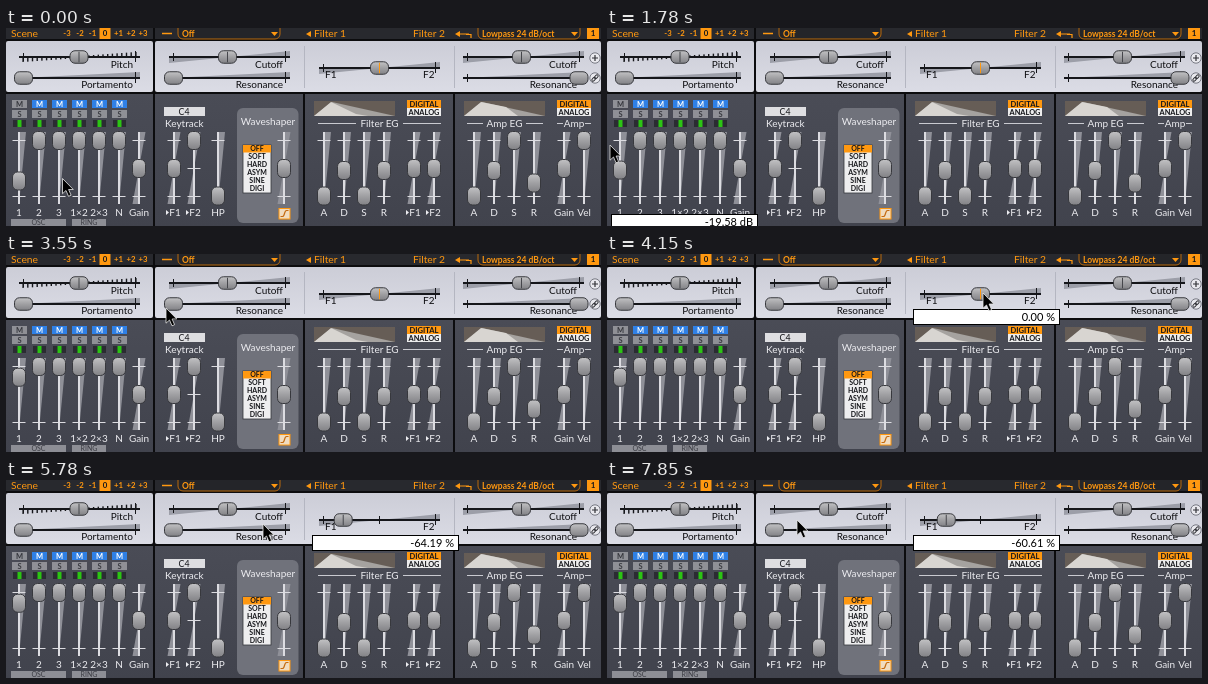
Write an HTML page that moves like this. It is 595x198 px and loops after 8000 ms.

```html
<!DOCTYPE html>
<html lang="en">
<head>
<meta charset="utf-8">
<title>Synth panel</title>
<style>
html, body { margin: 0; width: 100%; height: 100%; overflow: hidden; background: #0c0c0e; }
svg { display: block; width: 595px; height: 198px; font-family: Lato, "Open Sans", sans-serif; }
</style>
</head>
<body>
<svg id="stage" viewBox="0 0 595 198">
  <defs>
    <linearGradient id="light" x2="0" y2="1"><stop stop-color="#cccdd7"/><stop offset="1" stop-color="#dbdce5"/></linearGradient>
    <linearGradient id="dark" x2="0" y2="1"><stop stop-color="#4a4c56"/><stop offset="1" stop-color="#41434d"/></linearGradient>
    <linearGradient id="knob" x2="0" y2="1"><stop stop-color="#c2c2c4"/><stop offset=".5" stop-color="#a0a0a3"/><stop offset="1" stop-color="#828286"/></linearGradient>
  </defs>
</svg>
<script>
const NS = 'http://www.w3.org/2000/svg';
const stage = document.getElementById('stage');
const ORANGE = '#ff9810', INK = '#15161a', PALE = '#ececf0', BAR = '#28292e';

function add(tag, attrs, parent = stage) {
  const el = document.createElementNS(NS, tag);
  for (const k in attrs) el.setAttribute(k, attrs[k]);
  return parent.appendChild(el);
}
const box = (x, y, width, height, fill, more) => add('rect', { x, y, width, height, fill, ...more });
const path = (d, fill, more) => add('path', { d, fill, ...more });
const stroke = (d, color, w = 1) => path(d, 'none', { stroke: color, 'stroke-width': w });
function text(str, x, y, fill, size = 10, anchor = 'start', weight = 400, parent = stage) {
  const el = add('text', { x, y, fill, 'font-size': size, 'text-anchor': anchor, 'font-weight': weight }, parent);
  el.textContent = str;
  return el;
}
function knob(w, h, notch) {
  const g = add('g', {});
  add('rect', { x: -w / 2, y: -h / 2, width: w, height: h, rx: 5, fill: 'url(#knob)', stroke: '#37383d' }, g);
  if (notch) add('path', { d: `M0 ${1 - h / 2}V${h / 2 - 1}`, stroke: '#45464b' }, g);
  return g;
}
const place = (el, x, y) => el.setAttribute('transform', `translate(${x.toFixed(2)} ${y.toFixed(2)})`);

// Horizontal slider: 121 px groove, end marks where the knob stops
function hSlider(x, y, at, kind, labels) {
  const r = x + 121, c = x + 60.5, bipolar = kind !== 'single';
  if (kind === 'single') path(`M${x} ${y}L${r} ${y - 6}V${y}Z`, '#9c9ea8');
  if (kind === 'split') path(`M${x} ${y}V${y + 6}L${r} ${y - 6}V${y}Z`, '#9c9ea8');
  if (kind === 'ticks') {
    for (let i = -12; i <= 12; i++) {
      const h = 1 + Math.abs(i) / 3;
      box(c + i * 4.7 - .7, i < 0 ? y : y - h, 1.4, h, INK);
    }
  }
  box(x, y - 1, 121, 2, INK);
  stroke(`M${x + 4.5} ${y - 4}v8M${r - 4.5} ${y - 6}v11`, INK);
  if (bipolar) stroke(`M${c} ${y - 4}v8`, INK);
  for (const [s, lx, ly, a] of labels) text(s, lx, ly, '#0d0d10', 10, a);
  const k = knob(18, 12.5, bipolar);
  place(k, at, y);
  return k;
}

// Vertical slider: groove from 104 to 176, marks where the knob stops
function vSlider(x, y, split, label) {
  if (split) path(`M${x} 176H${x - 6.5}L${x + 6.5} 104H${x}Z`, '#8f9098');
  else path(`M${x} 176V104H${x + 7}Z`, '#8f9098');
  box(x - 1, 104, 2, 72, '#dcdce1');
  for (const m of split ? [112, 140, 168] : [112, 168]) box(x - 6.5, m, 13, 1, '#dcdce1');
  const arrow = label[0] === '▸';
  text(arrow ? label.slice(1) : label, arrow ? x + 1 : x, 188, PALE, 10, 'middle');
  if (arrow) path(`M${x - 8} 182l3 2.5l-3 2.5z`, PALE);
  const k = knob(13, 18);
  place(k, x, y);
  return k;
}

function modeSwitch(x) {
  box(x, 72, 34, 8, ORANGE);
  box(x, 80, 34, 8, '#ececec');
  text('DIGITAL', x + 17, 78.8, INK, 7.6, 'middle', 700);
  text('ANALOG', x + 17, 86.8, INK, 7.4, 'middle', 700);
}
function combo(x, label) {
  box(x, -6, 102, 17, '#242529', { rx: 5, stroke: '#b96a0c' });
  text(label, x + 4, 8.6, ORANGE, 8.5, 'start', 700);
  path(`M${x + 93} 4h7l-3.5 4z`, ORANGE);
}
function envelope(x, hold) {
  box(x, 73, 81, 15, '#665d56');
  path(`M${x} 88L${x + 18} 74L${x + 81} 88Z`, '#a5a29f');
  path(`M${x} 88L${x + 17} 74L${x + 42} ${hold}L${x + 54} 88Z`, '#d8d5d1');
}

// Top bar
box(0, 0, 147, 11, BAR);
box(149, 0, 446, 11, BAR);
text('Scene', 5, 8.8, ORANGE, 10.3);
box(93.5, 0, 11, 11, ORANGE);
['-3', '-2', '-1', '0', '+1', '+2', '+3'].forEach((s, i) =>
  text(s, [61, 74, 86.5, 99, 112.5, 125, 137][i], 8.3, s === '0' ? INK : ORANGE, 7.8, 'middle', 700));
stroke('M156 5.5h10', ORANGE, 1.5);
combo(172, 'Off');
path('M305 3v6l-5-3z', ORANGE);
text('Filter 1', 308, 8.8, ORANGE, 10.3);
text('Filter 2', 407, 8.8, ORANGE, 10.3);
path('M454 3v6l-5-3z', ORANGE);
stroke('M454 6h9M465 10V6.5H460', ORANGE, 1.2);
combo(472, 'Lowpass 24 dB/oct');
box(581, 0, 12, 11, ORANGE);
text('1', 587, 8.4, INK, 8, 'middle', 700);

// Light panels
box(0, 13, 147, 51, 'url(#light)', { rx: 2 });
box(149, 13, 446, 51, 'url(#light)', { rx: 2 });
stroke('M298.5 18v42M448.5 18v42', '#b4b6c1');
hSlider(13, 29, 73, 'ticks', [['Pitch', 127, 40, 'end']]);
hSlider(13, 50, 17.5, 'single', [['Portamento', 127, 60, 'end']]);
hSlider(163, 29, 221.5, 'split', [['Cutoff', 277, 39.5, 'end']]);
hSlider(163, 50, 167.5, 'single', [['Resonance', 277, 60, 'end']]);
const balance = hSlider(313, 40, 373, 'split', [['F1', 319, 50], ['F2', 417, 50]]);
hSlider(457, 29, 515.5, 'split', [['Cutoff', 571, 39.5, 'end']]);
hSlider(457, 50, 573, 'single', [['Resonance', 571, 60, 'end']]);
for (const y of [30, 50]) add('circle', { cx: 589, cy: y, r: 5.2, fill: '#e9e9ee', stroke: '#777983' });
stroke('M586 30h6M589 27v6', '#303136', 1.2);
for (const [x, y] of [[587.7, 51.3], [590.3, 48.7]])
  add('ellipse', { cx: x, cy: y, rx: 2.3, ry: 1.3, fill: 'none', stroke: '#303136', transform: `rotate(-45 ${x} ${y})` });

// Dark panels
for (const [x, w] of [[0, 147], [149, 148], [299, 148], [449, 146]]) box(x, 66, w, 132, 'url(#dark)');

// Mixer
let level;
['1', '2', '3', '1×2', '2×3', 'N'].forEach((s, i) => {
  const x = 13 + i * 20;
  box(x - 7, 72, 15, 8, i ? '#2f80e6' : '#8f9096');
  text('M', x + .5, 79, i ? '#fff' : '#35363c', 7.5, 'middle', 700);
  box(x - 7, 82, 15, 8, '#8f9096');
  text('S', x + .5, 89, '#3a3b41', 7.5, 'middle', 700);
  box(x - 6, 92, 13, 7, '#2b2c32');
  box(x - 1.5, 92, 4, 7, '#2cc414');
  const k = vSlider(x, 112.5, false, s);
  if (!i) level = k;
});
vSlider(133, 140.5, true, 'Gain');
for (const [x, w, s] of [[5, 55, 'OSC'], [66, 34, 'RING']]) {
  box(x, 191, w, 7, '#8d8e95');
  text(s, x + w / 2, 197, '#3b3c43', 7, 'middle');
}

// Keytrack
box(158, 79, 41, 9, '#dedee1');
text('C4', 178, 86.7, INK, 8.8, 'middle');
text('Keytrack', 159, 99, PALE);
vSlider(168, 140.5, true, '▸F1');
vSlider(188, 112.5, true, '▸F2');
vSlider(212, 168, false, 'HP');

// Waveshaper
box(231, 80, 61.5, 115, '#70727b', { rx: 6 });
text('Waveshaper', 262, 97, PALE, 10, 'middle');
box(237, 117, 28, 48, '#eeeeef', { stroke: '#34353b', 'stroke-width': .8 });
box(237, 117, 28, 7.5, ORANGE);
['OFF', 'SOFT', 'HARD', 'ASYM', 'SINE', 'DIGI'].forEach((s, i) =>
  text(s, 251, 123.4 + i * 8, INK, 7, 'middle', 700));
vSlider(278, 140.5, true, ' ');
box(273, 180.5, 11, 10.5, '#f0dcc0', { stroke: ORANGE });
stroke('M274.5 188.5h2c2.5 0 1.5-6 4-6h2', '#c46a10', 1.2);

// Envelopes
envelope(308, 86);
modeSwitch(401);
text('Filter EG', 373.5, 99, PALE, 10, 'middle');
stroke('M312 95.5h38M397 95.5h38', '#c9cad0');
[['A', 168], ['D', 142.5], ['S', 168], ['R', 142.5]].forEach(([s, y], i) => vSlider(318 + i * 20, y, false, s));
vSlider(408, 140.5, true, '▸F1');
vSlider(428, 140.5, true, '▸F2');

envelope(458, 79);
modeSwitch(551);
text('Amp EG', 498.5, 99, PALE, 10, 'middle');
text('Amp', 568, 99, PALE, 10, 'middle');
stroke('M461 95.5h16M520 95.5h17M551 95.5h6M579 95.5h6', '#c9cad0');
[['A', 168], ['D', 142.5], ['S', 112.5], ['R', 155]].forEach(([s, y], i) => vSlider(468 + i * 20, y, false, s));
vSlider(558, 140.5, true, 'Gain');
vSlider(578, 112.5, false, 'Vel');

// Value pop-ups and pointer
function popup(x, y) {
  const g = add('g', {});
  add('rect', { x: x + .5, y: y + .5, width: 146, height: 15, fill: '#fff', stroke: '#000' }, g);
  return { g, label: text('', x + 142, y + 12.3, '#000', 11, 'end', 400, g) };
}
const levelTip = popup(4, 186), balanceTip = popup(306, 55);
const pointer = path('M0 0V15.2L3.5 12L6 17.8L8.6 16.7L6.1 11H10.8Z', '#000', { stroke: '#e8e8e8', 'stroke-width': .8 });

// Tracks: [step, values...]
const LOOP = 8000, STEPS = 54;
const pointerKeys = [[0, 56.5, 150.5], [3, 20, 154], [5, 5, 153], [6, 5, 153], [7, 4, 150], [12, 3, 117], [14, 1, 101],
  [16, -4, 88], [18, -13, 70], [20, -14, 55], [21, -13, 58], [22, 8, 60], [24, 160, 54], [26, 362, 41], [27, 376, 39],
  [30, 376, 39], [38, 255, 44], [39, 257, 44], [40, 257, 44], [44, 204, 37], [45, 204, 37], [46, 123, 22],
  [47, 107, 21], [48, 109, 22], [53, 190, 40]];
const levelKeys = [[0, .277], [6, .277], [12, .4717], [14, .565], [20, .8078]];
const balanceKeys = [[0, 0], [30, 0], [38, -65.2], [39, -64.19], [40, -64.19], [44, -93], [45, -93], [46, -100], [48, -100], [53, -60.61]];

function sample(keys, s) {
  const i = keys.findIndex(k => k[0] >= s);
  if (i < 0) return keys[keys.length - 1].slice(1);
  if (i === 0) return keys[0].slice(1);
  const a = keys[i - 1], b = keys[i], u = (s - a[0]) / (b[0] - a[0]);
  return a.slice(1).map((v, n) => v + (b[n + 1] - v) * u);
}
const show = (tip, on) => tip.g.setAttribute('visibility', on ? 'visible' : 'hidden');

function draw(ms) {
  const s = Math.min(STEPS - 1, Math.floor((ms % LOOP + 6) * STEPS / LOOP));
  const [amp] = sample(levelKeys, s), [pct] = sample(balanceKeys, s);
  place(level, 13, 168.5 - 56 * amp);
  levelTip.label.textContent = (60 * Math.log10(amp)).toFixed(2) + ' dB';
  show(levelTip, s >= 7 && s <= 20);
  place(balance, 373.5 + pct * .565, 40);
  balance.lastChild.setAttribute('stroke', pct ? '#45464b' : ORANGE);
  balanceTip.label.textContent = pct.toFixed(2) + ' %';
  show(balanceTip, s >= 27);
  place(pointer, ...sample(pointerKeys, s));
}

const start = performance.now();
function tick() {
  draw(performance.now() - start);
  requestAnimationFrame(tick);
}
tick();
</script>
</body>
</html>
```
